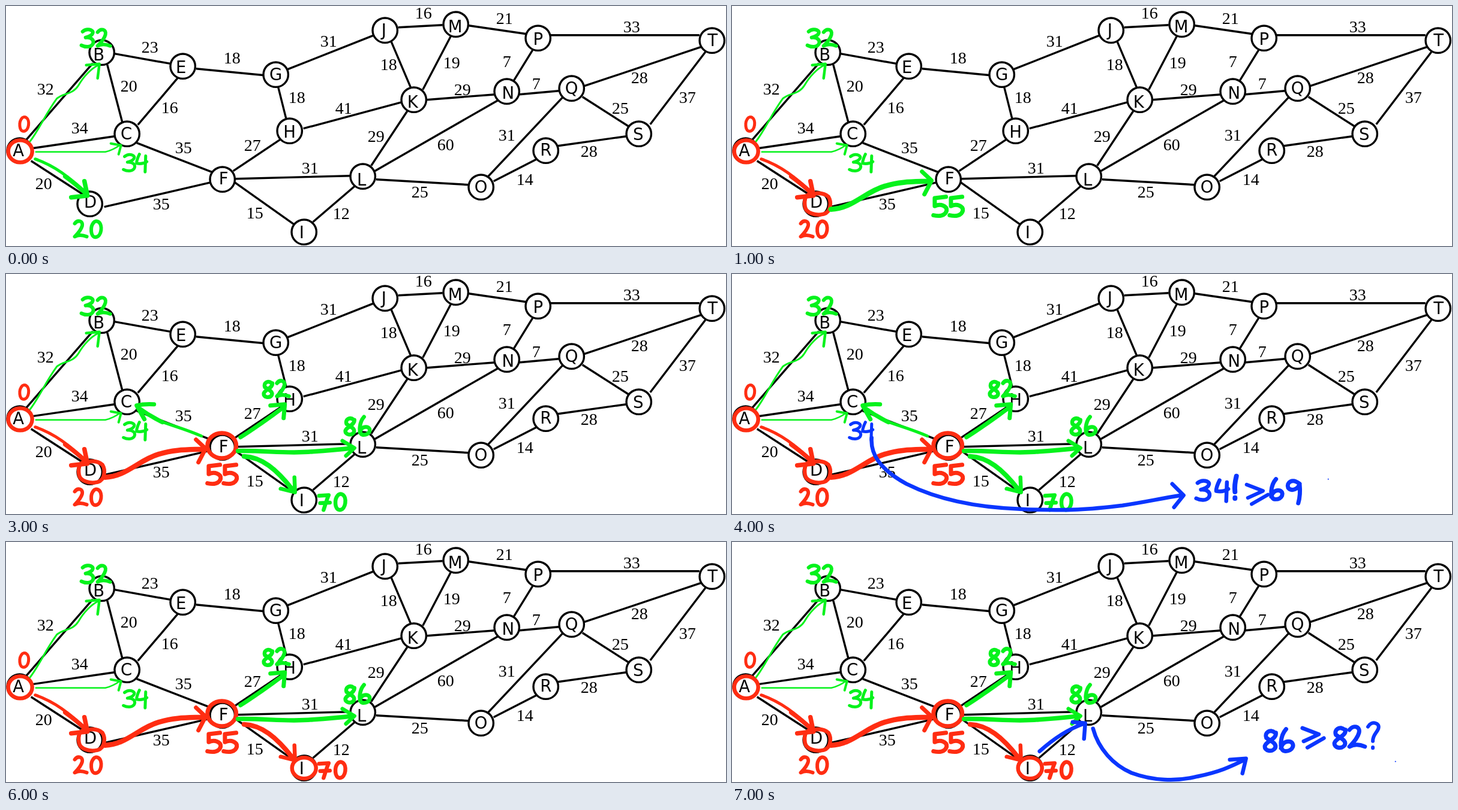
Write an HTML page that moves like this. It is 1200 by 401 pixels and loops after 8 s.

```html
<!DOCTYPE html>
<html lang="en">
<head>
<meta charset="utf-8">
<title>Shortest path search</title>
<style>
  :root { --go: #06f21c; --done: #ff2d12; --ask: #0a36ff; }
  html, body { margin: 0; width: 100%; height: 100%; overflow: hidden; background: #fff; }
  svg { display: block; }
  text { text-anchor: middle; }
  .cost { font: 28px "Liberation Serif", serif; }
  .name { font: 27.5px "DejaVu Sans", sans-serif; }
  .edges { stroke: #000; stroke-width: 3.4; fill: none; }
  .nodes circle { fill: #fff; stroke: #000; stroke-width: 3.4; }
  .ink { fill: none; stroke-linecap: round; stroke-linejoin: round; stroke-width: 6.5; }
  .ink g { stroke: transparent; animation: 8s step-end infinite; }
  .ink path { vector-effect: non-scaling-stroke; }
  .ink .open { stroke: var(--go); }
  .ink .start { stroke: var(--done); }
  .ink .toD { animation-name: toD; }
  .ink .ringD { animation-name: ringD; }
  .ink .toF { animation-name: toF; }
  .ink .ringF { animation-name: ringF; }
  .ink .fromF { animation-name: fromF; }
  .ink .backC { animation-name: backC; }
  .ink .toI { animation-name: toI; }
  .ink .ringI { animation-name: ringI; }
  .ink .costC { animation-name: costC; }
  .ink .askC { animation-name: askC; }
  .ink .askL { animation-name: askL; }
  @keyframes toD { 0% { stroke: var(--go); } 12.5% { stroke: var(--done); } }
  @keyframes ringD { 0% { stroke: transparent; } 12.5% { stroke: var(--done); } }
  @keyframes toF { 0% { stroke: transparent; } 12.5% { stroke: var(--go); } 25% { stroke: var(--done); } }
  @keyframes ringF { 0% { stroke: transparent; } 25% { stroke: var(--done); } }
  @keyframes fromF { 0% { stroke: transparent; } 37.5% { stroke: var(--go); } }
  @keyframes backC { 0% { stroke: transparent; } 37.5% { stroke: var(--go); } 62.5% { stroke: transparent; } }
  @keyframes toI { 0% { stroke: transparent; } 37.5% { stroke: var(--go); } 75% { stroke: var(--done); } }
  @keyframes ringI { 0% { stroke: transparent; } 75% { stroke: var(--done); } }
  @keyframes costC { 0% { stroke: var(--go); } 50% { stroke: var(--ask); } 62.5% { stroke: var(--go); } }
  @keyframes askC { 0% { stroke: transparent; } 50% { stroke: var(--ask); } 62.5% { stroke: transparent; } }
  @keyframes askL { 0% { stroke: transparent; } 87.5% { stroke: var(--ask); } }
</style>
</head>
<body>
<svg width="1200" height="401" viewBox="-.7 -.7 1200 401">
  <path class="edges" d="M33 223L144 95M43 237L180 217M41 258L126 313M168 97L193 193M180 79L275 96
    M219 198L286 119M217 228L343 277M163 335L341 294M316 104L430 115M453 135L466 187M469 105L613 48
    M495 204L659 160M378 275L457 222M382 288L573 283M379 293L479 364M511 360L582 299M653 35L727 31
    M641 58L674 136M741 49L694 139M700 156L815 147M668 175L608 266M614 275L819 157M616 289L770 298
    M771 32L867 46M907 48L1155 48M877 73L845 125M855 147L921 141M963 133L1157 68M960 151L1038 201
    M1165 76L1073 197M927 152L803 284M812 292L884 255M919 233L1033 217"/>
  <g class="nodes"></g>
  <g class="costs"></g>
  <g class="ink">
    <g class="open">
      <path stroke-width="3" d="M39 226C55 205 65 180 84 154C95 144 110 148 120 132C130 115 140 105 153 98"/>
      <path stroke-width="4.5" d="M133 98L155 96L152 120"/>
      <path stroke-width="2.5" d="M49 243L165 243Q178 240 190 231"/>
      <path stroke-width="4" d="M174 229L191 232L187 247"/>
    </g>
    <g class="costC"></g>
    <g class="toD">
      <path stroke-width="5" d="M48 255C80 266 106 286 132 312"/>
      <path stroke-width="7.5" d="M98 284Q115 296 132 312M108 319L135 316L130 292"/>
    </g>
    <g class="ringD">
      <path d="M135 314C122 311 119 322 121 335C123 346 140 350 152 347C165 343 165 326 160 318C152 311 140 311 128 315"/>
    </g>
    <g class="start">
      <ellipse cx="23" cy="242" rx="20" ry="18.5"/>
    </g>
    <g class="toF">
      <path stroke-width="8.5" d="M164 339C200 338 220 310 255 300C280 292 305 293 328 292"/>
      <path stroke-width="7" d="M316 276L332 291L320 314"/>
    </g>
    <g class="ringF"><ellipse cx="359" cy="286" rx="24" ry="21" stroke-width="7"/></g>
    <g class="fromF">
      <path stroke-width="7" d="M390 272C410 260 430 245 462 222M440 219L464 217L462 240"/>
      <path stroke-width="7.5" d="M386 295C430 294 470 300 510 296C540 294 560 292 577 290"/>
      <path d="M560 278L580 290L566 303"/>
    </g>
    <g class="backC">
      <path stroke-width="5" d="M325 270C290 255 265 250 247 241"/>
      <path stroke-width="7" d="M260 247Q238 236 219 222M246 217Q230 216 217 219L230 242"/>
    </g>
    <g class="toI">
      <path stroke-width="8" d="M396 304C425 305 450 325 477 360"/>
      <path d="M457 358L481 364L480 339"/>
    </g>
    <g class="ringI"><ellipse cx="496" cy="377" rx="20" ry="17.5"/></g>
    <g class="askC">
      <path d="M232 273C230 300 245 325 290 350C350 380 420 390 480 392C560 396 600 392 650 386C690 380 710 375 748 369M733 350L752 369L736 389"/>
      <path stroke-width="2" d="M993 342h.1"/>
    </g>
    <g class="askL">
      <path d="M512 349C535 328 560 312 585 303M567 300L588 302L586 328"/>
      <path d="M601 311C610 345 635 372 665 385C700 398 740 400 775 391C810 384 830 375 852 364M829 363L856 361L850 386"/>
      <path stroke-width="2" d="M1105 366h.1"/>
    </g>
  </g>
</svg>
<script>
const $ = s => document.querySelector(s);

function add(parent, tag, attrs, text) {
  const el = document.createElementNS("http://www.w3.org/2000/svg", tag);
  for (const k in attrs) el.setAttribute(k, attrs[k]);
  if (text) el.textContent = text;
  parent.append(el);
}

// name, circle centre, letter centre offset
const nodes = `A 22 241 -2 0,B 159 77 -5 4,C 201 213 -1 0,D 139 330 1 -3,E 294 100 -3 2,
F 360 289 2 -1,G 449 114 0 0,H 472 208 0 2,I 496 377 -4 1,J 631 40 -2 0,K 679 156 -2 4,
L 594 284 -2 6,M 749 30 -1 4,N 834 142 2 3,O 791 302 0 0,P 886 53 0 2,Q 942 137 0 0,
R 899 241 0 -1,S 1054 213 -1 1,T 1176 57 1 0`;
for (const n of nodes.split(",")) {
  const [name, x, y, dx, dy] = n.trim().split(" ");
  add($(".nodes"), "circle", { cx: x, cy: y, r: 20.7 });
  add($(".nodes"), "text", { class: "name", x: +x + +dx, y: +y + +dy + 9.7 }, name);
}

// cost and its centre
const costs = `32 65 138,34 122 203,20 62 296,23 239 68,20 204 133,16 272 169,35 295 236,
35 258 330,18 376 86,18 484 152,31 537 58,41 562 170,27 410 232,31 506 270,15 414 345,
12 558 346,16 695 11,18 637 97,19 742 94,29 760 139,29 616 217,60 732 231,25 689 310,
21 830 20,7 834 92,7 883 129,33 1042 34,28 1055 119,25 1023 170,37 1135 152,28 971 242,
14 864 289,31 834 215`;
for (const c of costs.split(",")) {
  const [cost, x, y] = c.trim().split(" ");
  add($(".costs"), "text", { class: "cost", x, y: +y + 9 }, cost);
}

// handwritten glyphs in a box of about 20 by 30
const glyphs = {
  0: "M6 3C-1 10 0 29 9 29C20 28 22 7 14 2C11 0 7 1 5 4",
  2: "M2 5C7-2 17 0 15 9C13 17 6 24 2 28Q11 23 23 28",
  3: "M2 4C9-2 20 1 19 6C18 11 11 13 7 14C17 13 22 19 19 25C15 31 6 30 0 27",
  4: "M7 0C4 6 2 12 2 16Q12 18 20 13M18 3L17 31",
  5: "M19 1L2 3L2 15C11 11 21 15 20 22C18 30 9 31 0 29",
  6: "M8 0C0 9-2 29 6 30C18 31 21 19 13 17C6 16 2 21 1 26",
  7: "M0 4L17 3C13 12 11 20 8 29M2 17L19 16",
  8: "M16 5C9-1 1 5 4 12C9 16 19 19 16 26C12 32 1 30 2 23C4 16 18 14 17 5",
  9: "M19 7C8-2-1 5 2 13C7 19 17 15 19 7C20 17 20 26 17 36",
  "!": "M5 0C3 8 2 14 3 22M3 30v1",
  ">": "M0 4L26 14L2 25M8 35L34 20",
  "?": "M2 6C7-3 20 0 17 9C14 16 9 18 9 27M9 36v1"
};

function write(group, word, x, y, size, step, width) {
  [...word].forEach((ch, i) => add($(".ink ." + group), "path", {
    d: glyphs[ch],
    transform: `translate(${x + i * step} ${y}) scale(${size})`,
    "stroke-width": width
  }));
}

write("start", "0", 21, 184, .85, 0, 5);
write("open", "32", 125, 38, 1, 25, 6);
write("costC", "34", 195, 247, .95, 20, 5);
write("toD", "20", 112, 358, .95, 28, 6);
write("toF", "55", 335, 317, 1.1, 27, 7);
write("fromF", "82", 427, 177, .95, 22, 6.5);
write("fromF", "86", 563, 238, 1, 25, 6.5);
write("toI", "70", 521, 366, .95, 26, 6.5);
write("askC", "34", 773, 344, 1.12, 31, 6.5);
write("askC", "!", 834, 337, 1.2, 0, 8);
write("askC", ">", 857, 347, 1.05, 0, 6);
write("askC", "69", 897, 342, 1.12, 27, 7);
write("askL", "86", 885, 312, 1.22, 28, 7);
write("askL", ">", 950, 306, 1.05, 0, 6.5);
write("askL", "82", 1001, 307, 1.22, 25, 7);
write("askL", "?", 1057, 301, 1.15, 0, 6);
</script>
</body>
</html>
```
